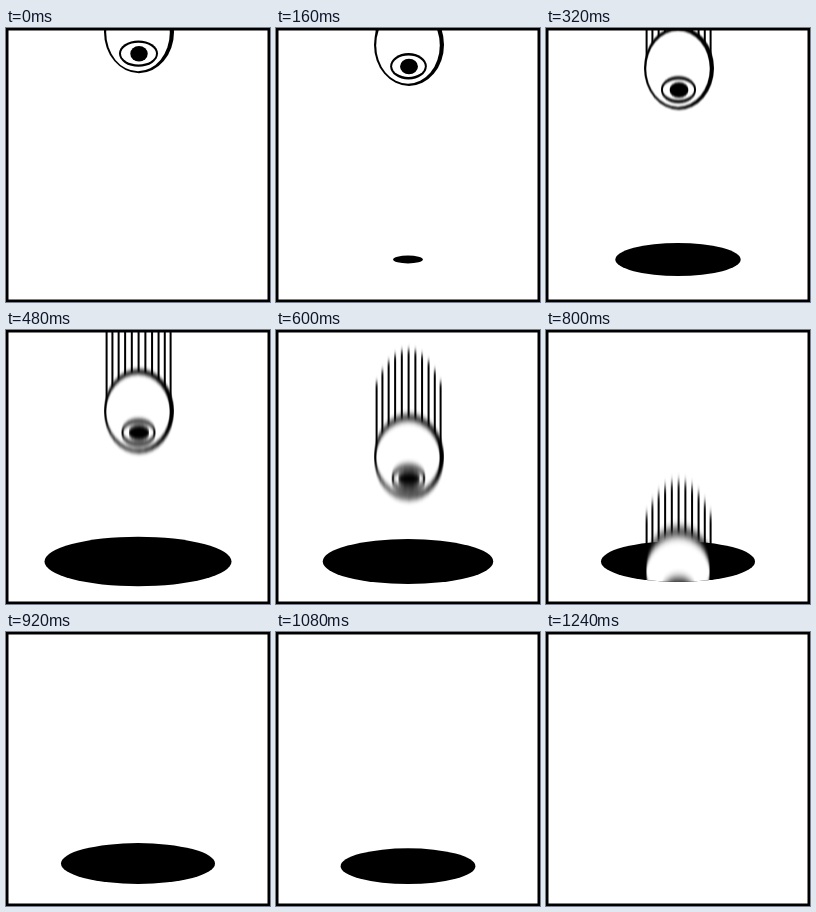
An HTML page that plays this animation: 264x274 px, repeating every 1560 ms.

```html
<!DOCTYPE html>
<html>
<head>
<meta charset="utf-8">
<style>
html, body { margin: 0; width: 100%; height: 100%; overflow: hidden; background: #fff; }
svg { display: block; width: 100vw; height: 100vh; }
</style>
</head>
<body>
<svg viewBox="0 0 264 274" preserveAspectRatio="none">
  <defs>
    <filter id="blur" filterUnits="userSpaceOnUse" x="80" y="-160" width="110" height="560" color-interpolation-filters="sRGB">
      <feGaussianBlur id="smear" stdDeviation="0 1"/>
    </filter>
    <clipPath id="above"><path id="rim"/></clipPath>
  </defs>
  <rect width="264" height="274" fill="#fff"/>
  <ellipse id="hole" cx="132"/>
  <g clip-path="url(#above)">
    <g filter="url(#blur)">
      <g id="ball">
        <path id="streaks" stroke="#000" stroke-width="2"/>
        <ellipse id="shell" cx="133" rx="35"/>
        <ellipse id="white" cx="132" cy="0.6" rx="31.8" fill="#fff"/>
        <ellipse id="iris" cx="132.5" cy="21.6"/>
        <ellipse id="gap" cx="132.5" cy="21.6" fill="#fff"/>
        <ellipse id="pupil" cx="133" cy="21.8" ry="7.7"/>
      </g>
    </g>
  </g>
  <path d="M0 0H264V274H0Z M2.5 2.5V271.5H261.5V2.5Z" fill-rule="evenodd"/>
</svg>
<script>
const $ = id => document.getElementById(id);
const STEP = 40, LOOP = 1560, LAST = 31;
const OPEN = 2.9, WIDE = 12, REST = 18, CLOSE = 23;
const PEAK = 93.5, CALM = 77;

const span = (n, a, b) => Math.min(1, Math.max(0, (n - a) / (b - a)));

function set(id, attrs) {
  for (const k in attrs) $(id).setAttribute(k, attrs[k]);
}

// The hole springs open, settles, then shuts towards its lower edge
function holeWidth(n) {
  const grow = PEAK * (1 - (1 - span(n, OPEN, WIDE)) ** 1.35);
  const settle = (PEAK - CALM) * span(n, WIDE, REST);
  return (grow - settle) * (1 - span(n, CLOSE, LAST) ** 3);
}

function drawHole(n) {
  const rx = holeWidth(n), ry = rx * 0.265;
  const cy = n > CLOSE ? 252 - ry : 231.5;
  set('hole', { cy, rx, ry });
  set('rim', { d: `M0 0H264V${cy}H${132 + rx}A${rx} ${ry} 0 0 1 ${132 - rx} ${cy}H0Z` });
}

function drawBall(n) {
  const y = 4 + 2.35 * n + 0.135 * n ** 2 + 0.017 * n ** 3;
  const speed = 2.35 + 0.27 * n + 0.051 * n ** 2;
  const s = speed * 0.17;
  const eye = 16.5 + 3 * Math.exp(-n / 8);

  let d = '';
  for (let k = -5; k <= 5; k++) {
    const x = 132.6 + 6.8 * k - 0.016 * k ** 3;
    d += `M${x} ${-161 + 3.6 * n + 1.3 * k * k}V0`;
  }
  set('streaks', { d });
  set('ball', { transform: `translate(0 ${y})` });
  set('smear', { stdDeviation: `0 ${s}` });

  // Outlines thicken vertically with speed
  set('shell', { ry: 41 + 0.4 * s });
  set('white', { ry: 38.8 - 0.5 * s });
  set('iris', { rx: eye, ry: 13 + 0.3 * s });
  set('gap', { rx: eye - 2, ry: 11 - 0.5 * s });
  set('pupil', { rx: 8.4 + 0.8 * s });
}

const start = performance.now();
function tick() {
  const time = (performance.now() - start) % LOOP;
  const n = Math.min(LAST, Math.floor(time / STEP));
  drawHole(n);
  drawBall(n);
  requestAnimationFrame(tick);
}
tick();
</script>
</body>
</html>
```
